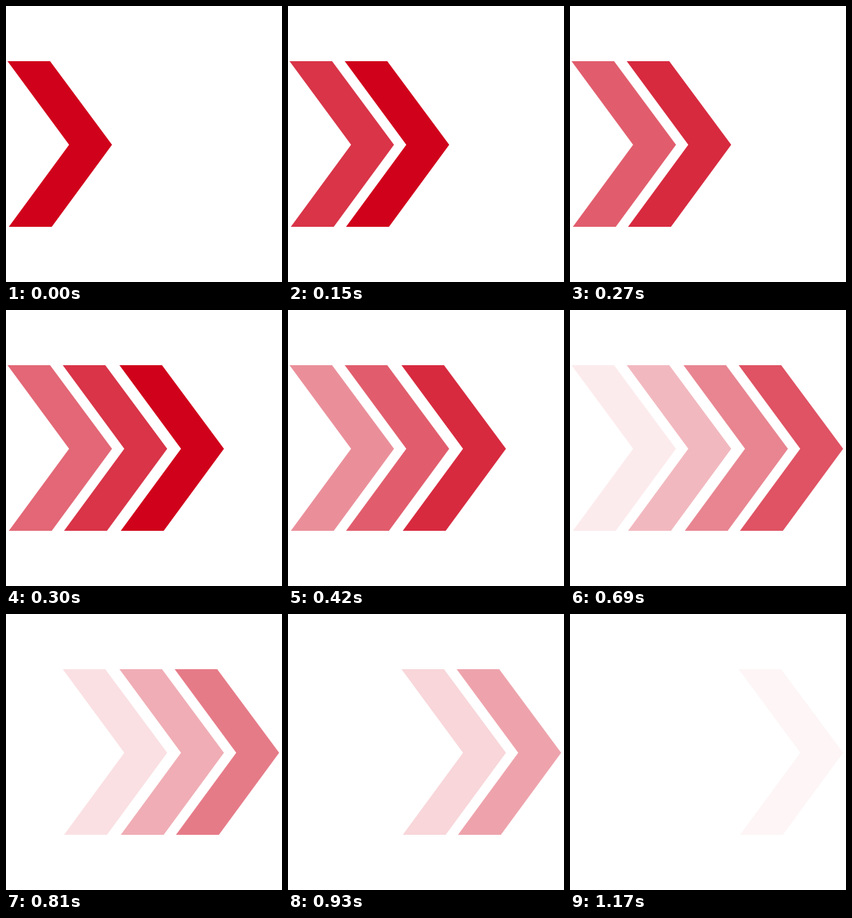
Recreate the animation shown at these times as an HTML page. Size 360 px wide and 360 px high, loop 1230 ms.

```html
<!DOCTYPE html>
<html lang="en">
<head>
<meta charset="utf-8">
<title>Chevrons</title>
<style>
  html, body { margin: 0; width: 100%; height: 100%; overflow: hidden; background: #fff; }
  svg { display: block; width: 100%; height: 100%; fill: #d0021b; }
</style>
</head>
<body>
<svg viewBox="0 0 360 360">
  <defs><path id="chevron" d="M2 72H57.5L138.3 181 59.7 288H3.7L82.3 181Z"/></defs>
  <use href="#chevron"/>
  <use href="#chevron" x="72"/>
  <use href="#chevron" x="146"/>
  <use href="#chevron" x="218"/>
</svg>
<script>
  const LOOP = 1230, STEP = 30, STAGGER = 150, FADE = 750;
  const chevrons = document.querySelectorAll('svg > use');

  // Each chevron snaps on in turn, then fades linearly; the last step is held.
  function draw(now) {
    const t = Math.min(Math.floor(now % LOOP / STEP) * STEP, LOOP - 2 * STEP);
    chevrons.forEach((chevron, i) => {
      const age = t - i * STAGGER;
      chevron.style.opacity = age < 0 ? 0 : Math.max(0, 1 - age / FADE);
    });
  }

  function tick() {
    draw(performance.now());
    requestAnimationFrame(tick);
  }
  tick();
</script>
</body>
</html>
```
